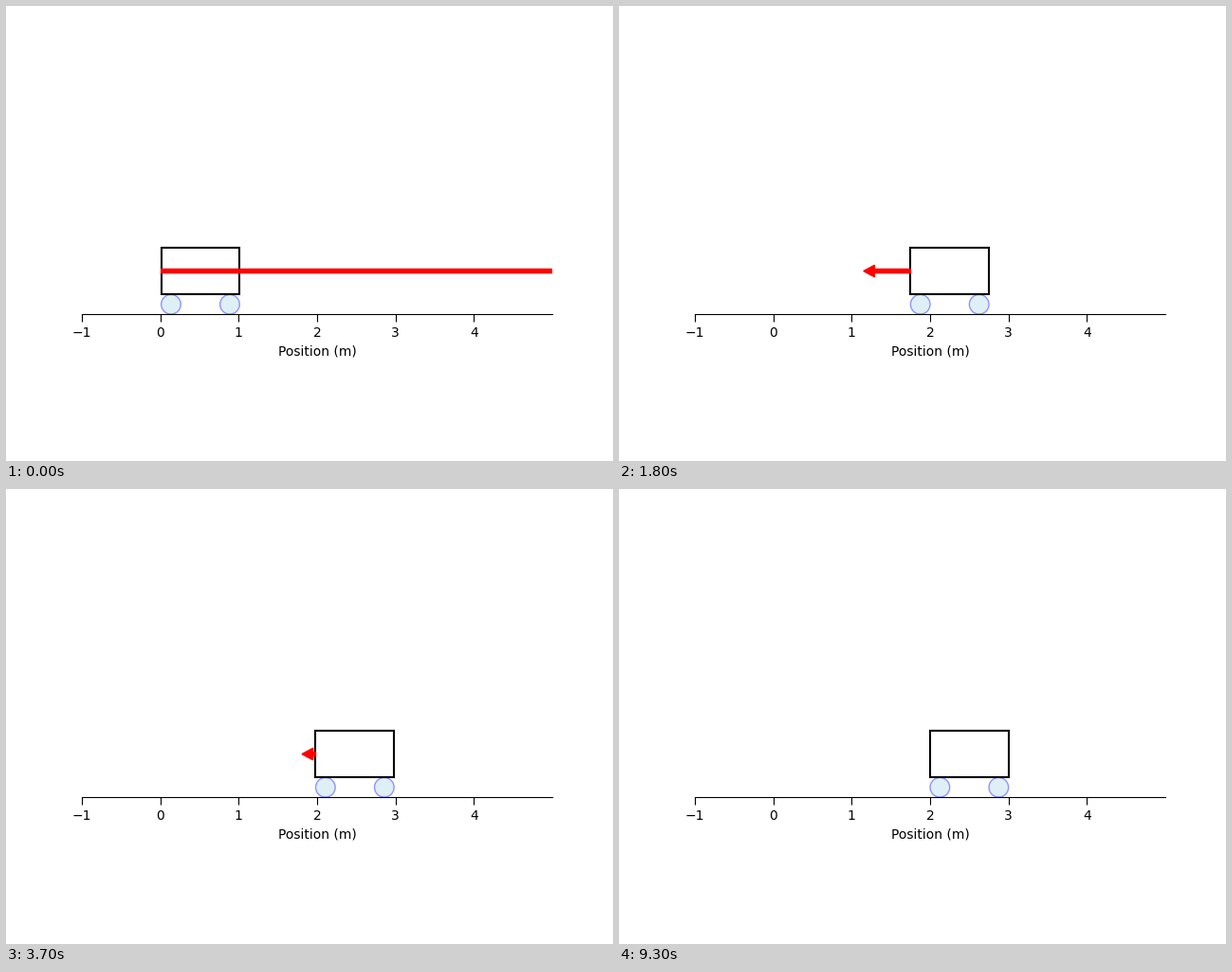
Animation of 640x480 px, one loop 10000 ms. Source, as a matplotlib script:

```python
import math

import matplotlib.pyplot as plt
from matplotlib.animation import FuncAnimation
from matplotlib.patches import Circle, FancyArrow, Rectangle

FRAMES, INTERVAL = 200, 50
TARGET = 2.0
KP, KD = 5.0, 5.0          # PD gains acting on a unit mass
WHEEL_R = 0.125
BODY_W, BODY_H = 1.0, 0.6
BODY_Y = 2 * WHEEL_R
ARROW_Y = BODY_Y + BODY_H / 2
MIN_FORCE = 1e-4

# Decay rates of the overdamped closed loop
root = math.sqrt(KD ** 2 - 4 * KP)
SLOW, FAST = (KD - root) / 2, (KD + root) / 2


def state(t):
    """Position and force of the cart at time t, starting at rest from 0."""
    a = TARGET * FAST / (FAST - SLOW) * math.exp(-SLOW * t)
    b = TARGET * SLOW / (FAST - SLOW) * math.exp(-FAST * t)
    return TARGET - a + b, FAST ** 2 * b - SLOW ** 2 * a


fig, ax = plt.subplots(figsize=(6.4, 4.8), dpi=100)
ax.set_xlim(-1, 5)
ax.set_ylim(0, 2)
ax.set_aspect("equal")
ax.set_xticks(range(-1, 5))
ax.set_yticks([])
ax.tick_params(axis="x", length=6)
ax.set_xlabel("Position (m)")
for side in ("left", "right", "top"):
    ax.spines[side].set_visible(False)

offsets = (WHEEL_R, BODY_W - WHEEL_R)
wheels = [
    ax.add_patch(Circle((dx, WHEEL_R), WHEEL_R, fc="lightblue", ec="blue",
                        alpha=0.4))
    for dx in offsets
]
body = ax.add_patch(Rectangle((0, BODY_Y), BODY_W, BODY_H, fill=False,
                              ec="black", lw=1.5, zorder=2))
arrow = ax.add_patch(FancyArrow(0, ARROW_Y, 1, 0, width=0.05, head_width=0.15,
                                head_length=0.14, color="red", zorder=2.2))


def update(i):
    x, force = state((i + 1) * INTERVAL / 1000)
    body.set_x(x)
    for wheel, dx in zip(wheels, offsets):
        wheel.center = (x + dx, WHEEL_R)
    visible = abs(force) >= MIN_FORCE
    arrow.set_visible(visible)
    if visible:
        arrow.set_data(x=x, y=ARROW_Y, dx=force, dy=0)
    return [body, arrow, *wheels]


anim = FuncAnimation(fig, update, frames=FRAMES, interval=INTERVAL,
                     repeat=True, repeat_delay=0)
plt.show()
```
